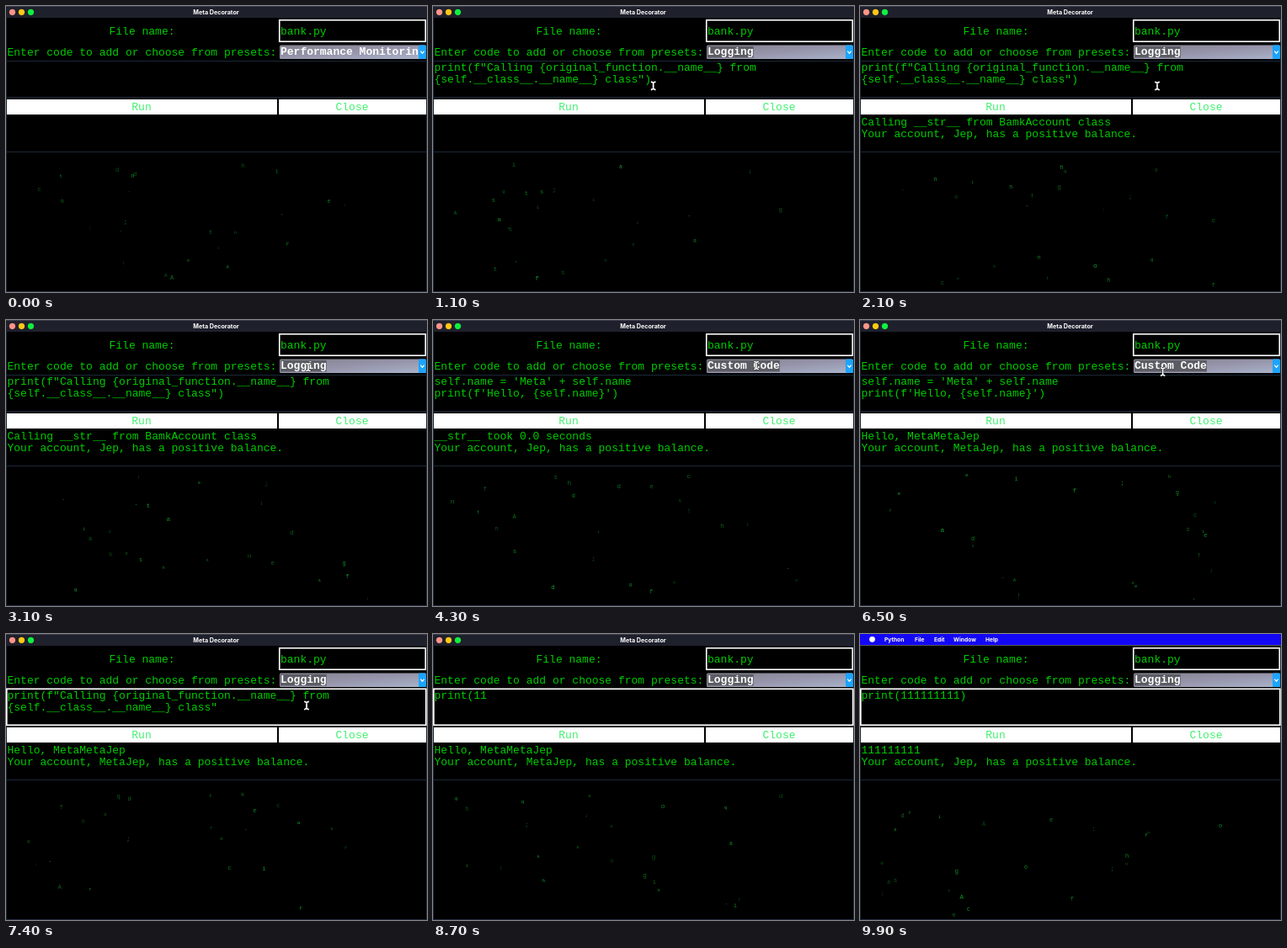
An HTML page that plays this animation: 500x340 px, repeating every 10000 ms.

```html
<!DOCTYPE html>
<html lang="en">
<head>
<meta charset="utf-8">
<title>Meta Decorator</title>
<style>
  html, body { margin: 0; width: 100%; height: 100%; overflow: hidden; background: #000; }
  svg { display: block; width: 500px; height: 340px; }
  text { white-space: pre; }
  .mono { font: 13px "Courier New", "Liberation Mono", monospace; fill: #00cc00; }
  .mono.pick { font-weight: bold; fill: #fff; }
  .mono.btn { fill: #40f070; }
  .ui { font: bold 7.2px Inter, "Open Sans", sans-serif; fill: #fff; }
  .menu { font-size: 6.7px; }
  .rain { font-family: "Liberation Mono", monospace; fill: #14b430; }
  .mid { text-anchor: middle; }
  .edge { fill: none; stroke: #1c2838; }
</style>
</head>
<body>
<svg viewBox="0 0 500 340">
  <defs>
    <linearGradient id="bar" x2="1" y2="1">
      <stop offset="0" stop-color="#83838f"/>
      <stop offset=".5" stop-color="#9694aa"/>
      <stop offset="1" stop-color="#a9b4ca"/>
    </linearGradient>
  </defs>
  <rect width="500" height="340"/>

  <g id="titleBar">
    <rect width="500" height="14" fill="#1e202c"/>
    <path d="M0 .5H500" stroke="#3c404c"/>
    <circle cx="7.5" cy="7.3" r="3.6" fill="#ff9488"/>
    <circle cx="18.5" cy="7.3" r="3.6" fill="#ffc814"/>
    <circle cx="29.5" cy="7.3" r="3.6" fill="#10f040"/>
    <text class="ui mid" x="249.5" y="9.8">Meta Decorator</text>
  </g>
  <g id="menuBar">
    <rect width="500" height="13" fill="#1408f4"/>
    <circle cx="14.5" cy="6.3" r="3.4" fill="#fff"/>
    <text class="ui menu" x="29" y="8.8">Python</text>
    <text class="ui menu" x="65" y="8.8">File</text>
    <text class="ui menu" x="88" y="8.8">Edit</text>
    <text class="ui menu" x="111" y="8.8">Window</text>
    <text class="ui menu" x="149" y="8.8">Help</text>
    <path d="M0 13.5H500" stroke="#55585c"/>
  </g>

  <text class="mono mid" x="161.5" y="34">File name:</text>
  <rect x="324.75" y="16.75" width="173.5" height="25.5" fill="#000" stroke="#fff" stroke-width="1.6"/>
  <text class="mono" x="326" y="33.5">bank.py</text>

  <text class="mono" x="1.5" y="59">Enter code to add or choose from presets:</text>
  <rect x="325" y="46.5" width="174" height="16.5" rx="1.5" fill="url(#bar)"/>
  <rect id="mark" x="326" y="48" height="13.5" fill="#5c5c64"/>
  <text class="mono pick" id="preset" x="326" y="58.2"></text>
  <rect x="490" y="46.5" width="9" height="16.5" rx="1.5" fill="#1ca4ff"/>
  <path d="M492.3 53.6l2.2 2.6l2.2-2.6" fill="none" stroke="#fff" stroke-width="1.2"/>

  <path class="edge" d="M.5 14V340M499.5 14V340"/>
  <rect class="edge" x=".5" y="65.5" width="499" height="43"/>
  <rect id="focus" x=".8" y="65.3" width="498" height="43" fill="none" stroke="#fff" stroke-width="1.7"/>
  <text class="mono" id="code0" x="1.5" y="77"></text>
  <text class="mono" id="code1" x="1.5" y="90.8"></text>

  <rect x="1" y="111" width="321" height="18" fill="#fff"/>
  <rect x="324" y="111" width="175" height="18" fill="#fff"/>
  <text class="mono btn mid" x="161" y="123.8">Run</text>
  <text class="mono btn mid" x="411" y="123.8">Close</text>

  <path class="edge" d="M0 173.5H500M0 339.5H500"/>
  <text class="mono" id="out0" x="1.5" y="142.3"></text>
  <text class="mono" id="out1" x="1.5" y="156"></text>

  <g id="rain" class="rain"></g>

  <g id="cursor" fill="none" stroke-linecap="square">
    <path d="M-2-4.5L0-3.5L2-4.5M0-3.5V3.5M-2 4.5L0 3.5L2 4.5" stroke="#222" stroke-width="2.6"/>
    <path d="M-2-4.5L0-3.5L2-4.5M0-3.5V3.5M-2 4.5L0 3.5L2 4.5" stroke="#fff" stroke-width="1.6"/>
  </g>
</svg>
<script>
const LOOP = 10000, TICK = 100, CHAR = 7.8;
const $ = id => document.getElementById(id);
const show = (id, on) => $(id).setAttribute("visibility", on ? "visible" : "hidden");

const logCode = 'print(f"Calling {original_function.__name__} from\n{self.__class__.__name__} class")';
const helloCode = "self.name = 'Meta' + self.name\nprint(f'Hello, {self.name}')";
const typed = "print(111111111)";
const balance = who => `\nYour account, ${who}, has a positive balance.`;

// Each list holds [start time, value]
const presets = [
  [0, "Performance Monitorin"], [800, "Logging"], [3400, "Performance Monitorin"],
  [4200, "Custom Code"], [6600, "Logging"]
];
const outputs = [
  [0, ""],
  [1500, "Calling __str__ from BamkAccount class" + balance("Jep")],
  [3800, "__str__ took 0.0 seconds" + balance("Jep")],
  [5000, "Jep account: 100 dollars" + balance("Jep")],
  [6100, "Hello, MetaMetaJep" + balance("MetaJep")],
  [9500, "111111111" + balance("Jep")]
];
// Pointer stops: time, x, y
const stops = [
  [300, 390, 90], [700, 372, 56], [1400, 190, 120], [1600, 190, 120],
  [2100, 353, 95], [3100, 359, 56], [3400, 362, 56], [3750, 250, 118],
  [4300, 384, 54], [4900, 230, 119], [5600, 402, 55], [6050, 230, 119],
  [6600, 372, 56], [7100, 357, 85], [7600, 357, 85]
];

const valueAt = (list, t) => list.filter(e => e[0] <= t).pop()[1];

function codeAt(t, preset) {
  if (t >= 8200) return typed.slice(0, Math.floor((t - 8200) / 60));
  if (preset === "Custom Code") return helloCode;
  if (preset !== "Logging") return "";
  const gone = t < 7300 ? 0 : t < 7600 ? 1 : 1 + (t - 7500) / TICK * 14;
  return logCode.slice(0, Math.max(0, logCode.length - gone));
}

function setLines(id, value) {
  const lines = value.split("\n");
  [0, 1].forEach(i => { $(id + i).textContent = lines[i] || ""; });
}

function moveCursor(t) {
  const i = stops.findIndex(s => s[0] > t);
  show("cursor", i > 0);
  if (i < 1) return;
  const [t0, x0, y0] = stops[i - 1], [t1, x1, y1] = stops[i];
  const p = (t - t0) / (t1 - t0), e = p * p * (3 - 2 * p);
  $("cursor").setAttribute("transform", `translate(${x0 + (x1 - x0) * e} ${y0 + (y1 - y0) * e})`);
}

function seeded(seed) {
  return () => {
    seed = seed + 0x6D2B79F5 | 0;
    let n = Math.imul(seed ^ seed >>> 15, 1 | seed);
    n ^= n + Math.imul(n ^ n >>> 7, 61 | n);
    return ((n ^ n >>> 14) >>> 0) / 4294967296;
  };
}

const letters = "aeoqgsrtfihnc:;.'!Ad";
const drops = Array.from({ length: 24 }, () => {
  const el = document.createElementNS("http://www.w3.org/2000/svg", "text");
  return $("rain").appendChild(el);
});

function scatter(step) {
  const rnd = seeded(step * 7919 + 17);
  for (const el of drops) {
    el.textContent = letters[Math.floor(rnd() * letters.length)];
    el.setAttribute("x", 18 + rnd() * 415);
    el.setAttribute("y", 186 + rnd() * 150);
    el.setAttribute("font-size", 5 + rnd() * 3);
    el.setAttribute("opacity", 0.4 + rnd() * 0.5);
  }
}

function draw(step) {
  const t = step * TICK, preset = valueAt(presets, t);
  $("preset").textContent = preset;
  $("mark").setAttribute("width", preset.length * CHAR);
  show("mark", t >= presets[1][0]);
  setLines("code", codeAt(t, preset));
  setLines("out", valueAt(outputs, t));
  show("focus", t >= 7100);
  show("menuBar", t >= 9700);
  show("titleBar", t < 9700);
  moveCursor(t);
  scatter(step);
}

let last = -1;
function frame() {
  const step = Math.floor(performance.now() % LOOP / TICK);
  if (step !== last) draw(last = step);
  requestAnimationFrame(frame);
}
frame();
</script>
</body>
</html>
```
